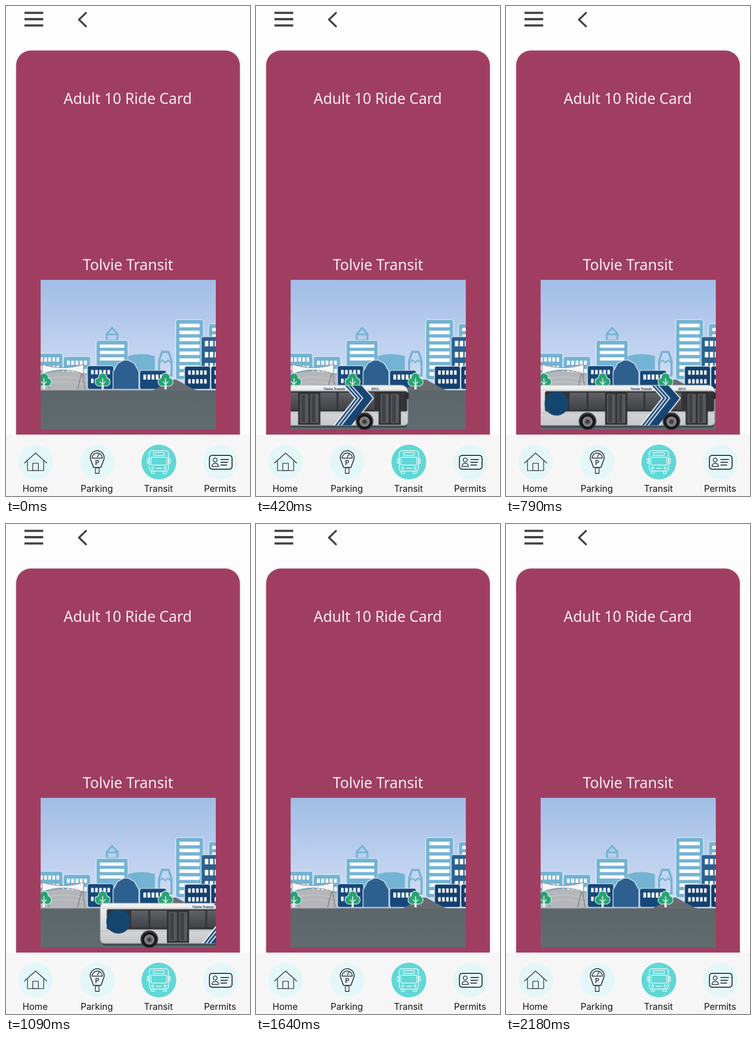
These frames come from a looping animation (528x1061 px, 2210 ms). An HTML page with a canvas:

```html
<!DOCTYPE html>
<html lang="en">
<head>
<meta charset="utf-8">
<title>Ride card</title>
<style>
html, body { margin: 0; width: 100%; height: 100%; overflow: hidden; background: #fdfdfd; }
canvas { display: block; width: 528px; height: 1061px; }
</style>
</head>
<body>
<canvas id="stage" width="528" height="1061"></canvas>
<script>
const LOOP = 2210;
const SCENE = { x: 74.5, y: 593, w: 379, h: 324 };
const SOFTNESS = 0.75; // the street scene is drawn small and enlarged
const GROUND = 830;
const LIGHT = '#73b3d3', NAVY = '#17487a', MID = '#2d608f', PALE = '#e3eef7', INK = '#444347';

const stage = document.getElementById('stage');
const newLayer = (w, h) => Object.assign(document.createElement('canvas'), { width: w, height: h });
const page = newLayer(528, 1061);
const skyline = newLayer(SCENE.w * SOFTNESS, SCENE.h * SOFTNESS);
const street = newLayer(SCENE.w * SOFTNESS, SCENE.h * SOFTNESS);
let ctx;

function paint(fill, stroke, width = 1.6) {
  if (fill) { ctx.fillStyle = fill; ctx.fill(); }
  if (stroke) { ctx.strokeStyle = stroke; ctx.lineWidth = width; ctx.stroke(); }
}
function box(x, y, w, h, fill, radius = 0, stroke, width) {
  ctx.beginPath();
  ctx.roundRect(x, y, w, h, radius);
  paint(fill, stroke, width);
}
function disc(x, y, r, fill, stroke, width) {
  ctx.beginPath();
  ctx.arc(x, y, r, 0, Math.PI * 2);
  paint(fill, stroke, width);
}
function line(x1, y1, x2, y2, color, width = 1.6) {
  ctx.beginPath();
  ctx.moveTo(x1, y1);
  ctx.lineTo(x2, y2);
  paint(null, color, width);
}
// Outline symmetric about cx, given its right half from top to bottom.
function mirrored(cx, half, fill, stroke, width, closed = true) {
  const left = half.map(([dx, y]) => [cx - dx, y]).reverse();
  const right = half.map(([dx, y]) => [cx + dx, y]);
  ctx.beginPath();
  [...left, ...right].forEach(([x, y]) => ctx.lineTo(x, y));
  if (closed) ctx.closePath();
  paint(fill, stroke, width);
}
// Region between two sagging curves that share their side edges.
function sag(x1, x2, top, topSag, bottom, bottomSag, fill, stroke) {
  const mid = (x1 + x2) / 2;
  ctx.beginPath();
  ctx.moveTo(x1, top);
  ctx.quadraticCurveTo(mid, top + topSag, x2, top);
  ctx.lineTo(x2, bottom);
  ctx.quadraticCurveTo(mid, bottom + bottomSag, x1, bottom);
  ctx.closePath();
  paint(fill, stroke);
}
function text(str, x, y, font, color, align = 'center') {
  ctx.font = font;
  ctx.fillStyle = color;
  ctx.textAlign = align;
  ctx.fillText(str, x, y);
}
function vertical(y0, y1, from, to) {
  const g = ctx.createLinearGradient(0, y0, 0, y1);
  g.addColorStop(0, from);
  g.addColorStop(1, to);
  return g;
}

// Windows share the width evenly and repeat downwards every `pitch`.
function building(x, y, w, color, cols, rows, pitch, bottom = GROUND) {
  box(x, y, w, bottom - y, color, 5, PALE);
  const cell = (w - 13) / cols;
  for (let r = 0; r < rows; r++)
    for (let c = 0; c < cols; c++)
      box(x + 8 + c * cell, y + 9 + r * pitch, cell - 3.2, pitch * 0.5, '#fff');
}
function drawTree(x) {
  const lobes = [[0, 804], [-7, 814], [7, 814]];
  line(x, 815, x, 830, PALE, 5);
  lobes.forEach(([dx, y]) => disc(x + dx, y, 10, '#d8f0e7'));
  lobes.forEach(([dx, y]) => disc(x + dx, y, 8.5, '#27a273'));
  line(x, 806, x, 829, '#e8f7f1', 2);
  [-6, 6].forEach(dx => line(x, 819, x + dx, 813, '#e8f7f1'));
}
function drawPavilion() {
  sag(74, 176, 800, -18, GROUND, 0, '#b4b6b9');
  [811, 821].forEach(y => sag(74, 176, y, -16, y + 1, -16, '#cfd0d2'));
  line(78, 778, 94, GROUND, '#85868b');
  line(168, 776, 155, GROUND, '#77787d');
  line(163, 780, 171, GROUND, '#77787d');
  sag(78, 168, 776, 14, 797, -18, '#f7f7f8', '#88898e');
}
function drawSkyline() {
  box(74, 593, 380, 240, vertical(593, 810, '#a1bde6', '#cfdcf3'));

  building(66, 752, 57, LIGHT, 5, 2, 18);
  building(124, 759, 59, LIGHT, 5, 2, 18);
  mirrored(229.5, [[0, 697], [11.5, 710], [11.5, 724]], null, LIGHT, 4);
  line(218, 711, 241, 711, LIGHT, 3.5);
  building(195, 724, 69, LIGHT, 1, 3, 13.8);
  sag(264, 322, 758, -9, GROUND, 0, LIGHT);
  mirrored(344.5, [[7, 749], [13.5, 768], [13.5, 800]], null, LIGHT, 4.5);
  mirrored(344.5, [[0, 772], [6, 767], [12, 772]], null, LIGHT, 3, false);
  building(367, 679, 60, LIGHT, 1, 8, 15, 809);
  building(438, 688, 30, LIGHT, 1, 2, 14);
  building(422, 716, 45, MID, 3, 3, 24);

  drawPavilion();
  building(176, 779, 57, NAVY, 5, 2, 19);
  building(289, 789, 58, NAVY, 5, 1, 22);
  mirrored(259.5, [[5, 767], [18, 774], [28, 792], [28, GROUND]], MID, PALE);
  building(386, 780, 56, '#123f6f', 5, 2, 19);
  building(443, 780, 25, '#123f6f', 2, 2, 19);

  box(74, 832, 380, 86, vertical(832, 917, '#5c666a', '#606b70'));
  box(74, GROUND, 340, 2, '#a9b0b6');
  mirrored(364, [[4, 809], [48, 833]], '#686b6f');
  [82, 209, 345].forEach(drawTree);
}

function drawHouseIcon(cx) {
  mirrored(cx, [[0, 968], [24.5, 990]], null, INK, 1.7, false);
  mirrored(cx, [[17.5, 1006], [17.5, 984]].reverse(), null, INK, 0.1, false);
  [-17.5, 17.5].forEach(dx => line(cx + dx, 985, cx + dx, 1006, INK, 1.7));
  line(cx - 18, 1006, cx + 18, 1006, INK, 1.7);
  box(cx - 6, 990, 12, 16, null, 0, INK, 1.7);
}
function drawMeterIcon(cx) {
  ctx.beginPath();
  ctx.arc(cx, 978, 15, Math.PI * 0.94, Math.PI * 0.06);
  ctx.lineTo(cx + 8, 999);
  ctx.lineTo(cx - 8, 999);
  ctx.closePath();
  paint(null, INK, 2.2);
  ctx.beginPath();
  ctx.arc(cx, 979, 11, Math.PI, 0);
  ctx.closePath();
  paint(null, INK, 1.8);
  line(cx, 977, cx + 4, 970, INK, 1.8);
  text('P', cx, 994, 'bold 14px Inter, sans-serif', INK);
  box(cx - 4, 1000, 8, 12, null, 0, INK, 1.8);
}
function drawBusIcon(cx) {
  const white = '#effcfb';
  box(cx - 20.5, 963, 41, 44, null, 5, white);
  box(cx - 12, 967, 24, 6, null, 1, white, 1.4);
  box(cx - 17, 977, 34, 17, null, 2, white, 1.4);
  line(cx - 6, 1001, cx + 6, 1001, white);
  [-1, 1].forEach(side => {
    disc(cx + side * 13.5, 1000.5, 2.2, null, white, 1.4);
    box(cx + side * 13 - 3.5, 1007, 7, 5, null, 1, white, 1.4);
    box(cx + side * 23.5 - 1.5, 980, 3, 10, null, 1, white, 1.3);
  });
}
function drawPermitIcon(cx) {
  const ink = '#222226';
  box(cx - 24, 973, 49, 30, null, 6, ink, 2);
  disc(cx - 11.5, 983, 4.2, null, ink);
  ctx.beginPath();
  ctx.arc(cx - 11.5, 997, 7, Math.PI, 0);
  ctx.closePath();
  paint(null, ink);
  for (let i = 0; i < 3; i++) line(cx, 982 + i * 6, cx + 18 - i * 2, 982 + i * 6, ink, 1.9);
}
function drawNav() {
  const items = { Home: drawHouseIcon, Parking: drawMeterIcon, Transit: drawBusIcon, Permits: drawPermitIcon };
  box(0, 928, 528, 133, '#f6f6f7');
  Object.entries(items).forEach(([label, icon], i) => {
    const cx = 64 + i * 133.4;
    disc(cx, 987.5, 37.7, label === 'Transit' ? '#61d8d6' : '#e4f7f8');
    icon(cx);
    text(label, cx - 1, 1052, '19.5px Inter, sans-serif', '#171719');
  });
}
function drawPage() {
  const heading = '32px "Noto Sans", "Open Sans", sans-serif';
  box(0, 0, 528, 1061, '#fdfdfd');
  for (let i = 0; i < 3; i++) box(40, 12.4 + i * 13.7, 40.5, 4.8, INK);
  ctx.lineCap = ctx.lineJoin = 'round';
  [15, 44].forEach(y => line(173, y, 158, 29.5, INK, 4.2));
  ctx.lineCap = 'butt';

  ctx.shadowColor = 'rgba(0,0,0,.22)';
  ctx.shadowBlur = 5;
  box(22, 96.5, 484, 870, '#a03e62', 32);
  ctx.shadowColor = 'transparent';
  text('Adult 10 Ride Card', 263.5, 212, heading, '#f7eef2');
  text('Tolvie Transit', 264, 572, heading, '#f7eef2');
  drawNav();
}

function drawWheel(x) {
  disc(x, 899, 19, '#3a3a3d');
  disc(x, 900, 16.5, '#18181b');
  disc(x, 900, 10, '#77777a', '#a5a5a8');
  disc(x, 900, 4.5, '#3c3c40');
}
function drawDoor(x) {
  box(x, 835, 48, 72, '#303134');
  [4, 26].forEach(dx => box(x + dx, 840, 18, 63, '#57595c'));
  [7, 29].forEach(dx => box(x + dx, 842, 8, 59, '#3f4144'));
}
function drawChevron(tip, width, color) {
  const edge = [[tip - 24, 822], [tip, 849], [tip - 46, 908]];
  ctx.beginPath();
  edge.forEach(([x, y]) => ctx.lineTo(x, y));
  edge.reverse().forEach(([x, y]) => ctx.lineTo(x - width, y));
  paint(color);
}
// x = 0 is the centre of the round badge near the rear.
function drawBus() {
  box(-34, 905, 374, 8, 'rgba(45,50,54,.55)', 4);
  box(-39, 821, 381, 87, vertical(821, 908, '#f2f2f2', '#c6c7c9'), [9, 14, 8, 9], '#a9abae', 1);
  line(-36, 832, 338, 832, '#b9babd', 1.2);
  line(-38, 881, 341, 881, '#aeb0b3', 1.2);

  box(-25, 834, 366, 44, '#333437', 4);
  for (let x = 28; x < 270; x += 41) box(x, 837, 37, 37, vertical(837, 874, '#606164', '#414245'), 2);

  drawChevron(269, 42, '#eceded');
  drawChevron(266, 20, '#174674');
  drawChevron(243, 5, '#1c4d7c');
  drawChevron(235, 4.5, '#1c4d7c');

  [105, 279].forEach(drawDoor);
  [67, 248.5].forEach(drawWheel);
  disc(0, 861, 26, '#14456f');
  const lettering = 'bold 7px "Noto Sans", sans-serif';
  text('Tolvie Transit', 160, 831, lettering, '#17406b', 'left');
  text('2012', 263, 831, lettering, '#17406b', 'left');
  box(337, 837, 7, 14, '#2c2c2f', 2);
}

// Brakes toward mid-stage, then pulls away; the cubic term sharpens the entry.
function busX(t) {
  const u = t - 675;
  const entry = Math.max(0, 420 - t);
  return 74.6 + 0.259 * u + 0.00035 * u * Math.abs(u) - 3.4e-7 * entry ** 3;
}

function useSceneLayer(layer) {
  ctx = layer.getContext('2d');
  ctx.setTransform(SOFTNESS, 0, 0, SOFTNESS, -SCENE.x * SOFTNESS, -SCENE.y * SOFTNESS);
}
function frame() {
  useSceneLayer(street);
  ctx.drawImage(skyline, SCENE.x, SCENE.y, skyline.width / SOFTNESS, skyline.height / SOFTNESS);
  ctx.translate(busX(performance.now() % LOOP), 0);
  drawBus();

  ctx = stage.getContext('2d');
  ctx.imageSmoothingQuality = 'high';
  ctx.drawImage(page, 0, 0);
  ctx.drawImage(street, SCENE.x, SCENE.y, SCENE.w, SCENE.h);
  requestAnimationFrame(frame);
}

ctx = page.getContext('2d');
drawPage();
useSceneLayer(skyline);
drawSkyline();
frame();
</script>
</body>
</html>
```
